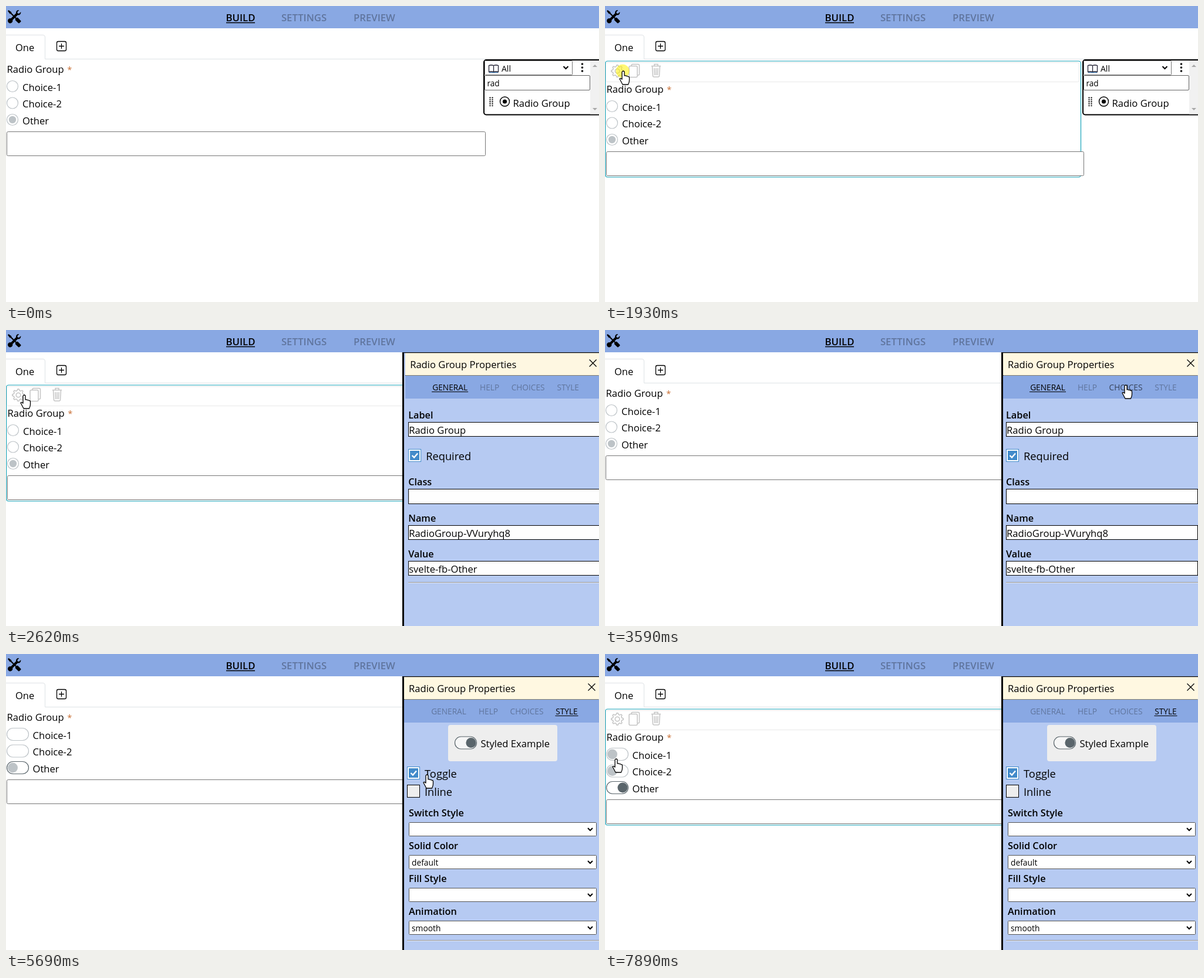
Recreate the animation shown at these times as an HTML page. Size 1010x505 px, loop 8000 ms.

```html
<!DOCTYPE html>
<html lang="en">
<head>
<meta charset="utf-8">
<title>Form builder</title>
<style>
html, body { margin: 0; width: 100%; height: 100%; overflow: hidden; background: #fff; }
svg { display: block; width: 100vw; height: 100vh; }
text { font-family: "Open Sans", "Noto Sans", sans-serif; white-space: pre; }
</style>
</head>
<body>
<svg id="stage" viewBox="0 0 1010 505"></svg>
<script>
const LOOP = 8000;
const BLUE = '#89a8e3', PALE = '#b6caf2', GREY = '#bdc3c7', SLATE = '#5a656b';
const OPEN = 2035, STYLE = 4340, TOGGLED = 5450, SWITCHED = 5620;

// Pointer stops: time, x, y
const stops = [
  [330, 938, 490], [750, 588, 178], [890, 588, 178], [1660, 30, 112], [1730, 31, 111],
  [2740, 31, 111], [3510, 887, 94], [3590, 887, 94], [3940, 943, 97], [4490, 943, 97],
  [5100, 719, 205], [5170, 717, 206], [6200, 717, 206], [6780, 35, 180], [6880, 35, 180],
  [7130, 38, 237], [7210, 38, 237], [7540, 10, 174], [7690, 18, 180], [7820, 18, 180], [7890, 19, 179]
];

const clamp = v => Math.max(0, Math.min(1, v));
const ramp = (t, from, length) => clamp((t - from) / length);
const smooth = v => v * v * (3 - 2 * v);
const mix = (a, b, v) => a + (b - a) * v;

const text = (s, x, y, size = 16.6, extra = '') => `<text x="${x}" y="${y}" font-size="${size}" ${extra}>${s}</text>`;
const rect = (x, y, w, h, fill, stroke = 'none', r = 0, extra = '') =>
  `<rect x="${x}" y="${y}" width="${w}" height="${h}" fill="${fill}" stroke="${stroke}" rx="${r}" ${extra}/>`;
const circle = (x, y, r, fill, stroke = 'none', extra = '') =>
  `<circle cx="${x}" cy="${y}" r="${r}" fill="${fill}" stroke="${stroke}" ${extra}/>`;
const line = (d, stroke = '#000', width = 1, extra = '') =>
  `<path d="${d}" fill="none" stroke="${stroke}" stroke-width="${width}" ${extra}/>`;
const shape = (d, extra = '') => `<path d="${d}" ${extra}/>`;
const group = (attrs, body) => `<g ${attrs}>${body}</g>`;
const move = (x, y, body) => group(`transform="translate(${x} ${y})"`, body);

const tools = 'M1 0L0 1l2.2 3.081a1 1 0 0 0 .815.419h.07a1 1 0 0 1 .708.293l2.675 2.675-2.617 2.654A3 3 0 1 0 5.878 12.149l2.654-2.617.968.968-.305.914a1 1 0 0 0 .242 1.023l3.356 3.356a1 1 0 0 0 1.414 0l1.586-1.586a1 1 0 0 0 0-1.414l-3.356-3.356a1 1 0 0 0-1.023-.242L10.5 9.5l-.96-.96 2.68-2.643A3 3 0 0 0 15.898 2.223l-2.14 2.141L12 4l-.364-1.757L13.777.102a3 3 0 0 0-3.675 3.68L7.462 6.46 4.793 3.793a1 1 0 0 1-.293-.707v-.071a1 1 0 0 0-.419-.814z';
const hand = 'M-2 2a2 2 0 0 1 4 0v6q2-1 3.2.6 2-.9 3 .9 2.3-.4 2.300 2V16q0 3-2 7H-1Q-4 17-6 13.500q.5-2.500 4 .5z';
const arrow = 'M0 0v17l4-4 3 6 2.500-1-3-6h5.500z';

const gear = 'M' + Array.from({ length: 32 }, (_, i) => {
  const r = i % 4 < 2 ? 10.2 : 7.8, a = (i - .5) * Math.PI / 16;
  return (r * Math.cos(a)).toFixed(1) + ' ' + (r * Math.sin(a)).toFixed(1);
}).join('L') + 'z';

function pointer(t) {
  if (t < stops[0][0]) return null;
  const i = stops.findIndex(s => s[0] > t);
  if (i < 0) return stops.at(-1).slice(1);
  const [a, b] = [stops[i - 1], stops[i]], v = smooth(ramp(t, a[0], b[0] - a[0]));
  return [mix(a[1], b[1], v), mix(a[2], b[2], v)];
}

const clickable = (x, y) =>
  (x < 100 && y > 100 && y < 123) || (x < 116 && y > 160 && y < 240) ||
  (x > 722 && y > 86 && y < 110) || (x > 683 && x < 772 && y > 192 && y < 246);

const navItem = (s, x, extra) => text(s, x, 26, 16.7, `font-weight="600" text-anchor="middle" ${extra}`);

function header() {
  return rect(0, 0, 1010, 38, BLUE) +
    group('transform="translate(3 7) scale(1.4)"', shape(tools)) +
    navItem('BUILD', 399.5) + line('M375 28.500H424', '#000', 1.3) +
    navItem('SETTINGS', 507.5, 'opacity=".3"') + navItem('PREVIEW', 627.5, 'opacity=".3"') +
    line('M0 49.500H63q3.500 0 3.500 3.500V90.500H1010', '#dee2e6') + text('One', 16, 77, 16.5) +
    rect(86.5, 60.5, 16, 16, 'none', '#000', 2.5, 'stroke-width="1.3"') +
    line('M90 68.500h9M94.500 64v9', '#000', 1.3);
}

const chevron = (x, y) => line(`M${x - 4} ${y - 2}l4 4 4-4`, '#000', 2);

function palette() {
  let dots = '';
  for (let i = 0; i < 10; i++) dots += circle(824.5 + i % 2 * 4, 156.5 + (i >> 1) * 3.4, 1.2, '#222');
  return rect(814, 92, 210, 93.5, '#fff', '#000', 4, 'stroke-width="2"') +
    rect(995, 93, 15, 91.5, '#f1f1f1') +
    shape('M999 104l4-4 4 4zM999 174l4 4 4-4z', 'fill="#a8a8a8"') +
    rect(815.5, 93.5, 149, 24, '#fff', '#767676', 1) +
    shape('M822.500 101.500q4-1.500 8 0 4-1.500 8 0v11q-4-1.500-8 0-4-1.500-8 0zM830.500 101.500v11', 'fill="#fff" stroke="#223" stroke-width="1.3"') +
    line('M823 113.500h15', '#2c6fb0') +
    text('All', 844, 112, 14) + chevron(953.5, 105) +
    [99, 105, 111].map(y => circle(981.5, y, 1.8, '#000')).join('') +
    rect(815.5, 118.5, 179, 25, '#fff', '#666', 1.5) + text('rad', 819.5, 137, 13.6) +
    dots + circle(849.5, 163, 8, 'none', '#000', 'stroke-width="1.4"') + circle(849.5, 163, 3.6, '#000') +
    text('Radio Group', 863.5, 172);
}

function toolbar() {
  return rect(.5, 94, 810, 198, 'none', '#17a2b8', 4, 'stroke-width="1.2"') +
    rect(1.5, 96.5, 806, 33, 'none', '#e8e8e8', 3) +
    group(`fill="none" stroke="${'#c4c4c4'}" stroke-width="1.5"`,
      move(21, 111, shape(gear) + '<circle r="3.8"/>') +
      shape('M45 103v-1.500q0-2 2-2h9.500q2 0 2 2V116q0 2-2 2H55') +
      '<rect x="41" y="102.500" width="14" height="19" rx="2"/>' +
      shape('M79 102.500h16M84 102v-2.500h6v2.500M80.500 103l1 16q.2 2 2 2h7q1.800 0 2-2l1-16M84 106l.5 12M87 106v12M90 106l-.5 12'));
}

// Switch with its knob sliding from left to right as "on" goes from 0 to 1
function pill(x, y, border, on, show = 1) {
  const cx = mix(x + 10, x + 27.5, on);
  return rect(x, y - 10.5, 37, 21, '#fff', border, 10.5, 'fill-opacity=".5" stroke-width="1.2"') +
    circle(cx, y, 8.5, GREY, 'none', `opacity="${show}"`) + circle(cx, y, 8.5, SLATE, 'none', `opacity="${on}"`);
}
const ring = (x, y, dot) => circle(x, y, 9.5, 'none', GREY, 'stroke-width="1.2"') + circle(x, y, dot, GREY);

function radioGroup(t, hover) {
  const on = smooth(ramp(t, 5700, 260)), show = ramp(t, 5710, 380), switches = t >= SWITCHED;
  const rows = ['Choice-1', 'Choice-2', 'Other'].map((s, i) => {
    const y = [137, 165.5, 194][i], last = i === 2;
    const mark = switches
      ? pill(1.5, y, last ? SLATE : GREY, last ? on : 0, last ? 1 : show)
      : ring(11, y, last ? 6.2 : 0);
    return mark + text(s, switches ? 45.5 : 28, y + 7.5);
  }).join('');
  return (hover ? toolbar() : '') + move(hover ? 1 : 0, hover ? 34 : 0,
    text('Radio Group', 1.5, 113.5) + text('*', 104.5, 113.5, 14, 'fill="#c66a2e"') + rows +
    rect(1.5, 214.5, hover ? 813 : 815, 41, '#fff', '#767676', 2));
}

const label = (s, x, y) => text(s, x, y, 16.3, 'font-weight="600"');
const rule = y => line(`M683 ${y}H1010`, '#999') + line(`M683 ${y + 1}H1010`, '#e4e8f0');

function checkbox(s, y, on) {
  const box = on
    ? rect(683.5, y + .5, 21, 21, '#fff', '#428bca') + rect(686, y + 3, 16, 16, '#428bca') +
      line(`M689.500 ${y + 11}l3.500 3.500 6-7`, '#fff', 2.4)
    : rect(683.5, y + .5, 21, 21, '#eee', '#000');
  return box + text(s, 713, y + 18.5, 18.3);
}

function general() {
  const fields = [['Label', 'Radio Group', 151, 157.5], ['Class', '', 265, 271.5],
    ['Name', 'RadioGroup-VVuryhq8', 327, 333.5], ['Value', 'svelte-fb-Other', 388, 394.5]];
  return fields.map(([name, value, y, top]) =>
    label(name, 683, y) + rect(683.5, top, 326, name === 'Class' ? 25 : 24, '#fff', '#000') +
    text(value, 684, top + 19)).join('') + checkbox('Required', 203, true) + rule(430.5);
}

function styling(t) {
  const toggled = t >= TOGGLED;
  const fields = [['Solid Color', 'default'], ['Fill Style', ''], ['Animation', 'smooth']];
  if (toggled) fields.unshift(['Switch Style', '']);
  const example = toggled
    ? pill(764.5, 151.5, SLATE, smooth(ramp(t, TOGGLED, 220)))
    : ring(774, 152, 6.2 * smooth(ramp(t, 4390, 240)));
  return rect(753, 121, 186, 62, '#eee', 'none', 4) + example +
    text('Styled Example', toggled ? 808.5 : 791, 159) +
    checkbox('Toggle', 192, toggled) + checkbox('Inline', 223, false) +
    fields.map(([name, value], i) => move(0, i * 56,
      label(name, 686, 276.5) + rect(686.5, 287.5, 319, 23, '#fff', '#555', 1) +
      text(value, 691, 304.5, 13.8) + chevron(995, 299))).join('') +
    rule(264.5 + fields.length * 56);
}

function panel(t, x, y) {
  const enter = 1 - (1 - ramp(t, OPEN, 750)) ** 3;
  const active = t < STYLE ? 'GENERAL' : 'STYLE';
  const tabs = [['GENERAL', 754, 31], ['HELP', 821.5, 17], ['CHOICES', 887, 29.5], ['STYLE', 955, 19.5]];
  const bar = tabs.map(([s, cx, half]) => {
    const over = Math.abs(x - cx) < half && y > 86 && y < 110;
    const alpha = s !== active ? (over ? .6 : .3) : s === 'STYLE' ? mix(.6, 1, ramp(t, STYLE, 350)) : 1;
    return group(`opacity="${alpha}"`, text(s, cx, 103, 13.7, 'font-weight="500" text-anchor="middle"') +
      (s === active ? line(`M${cx - half} 105.500h${2 * half}`, '#000', 1.2) : ''));
  }).join('');
  return rect(675, 38, 335, 467, PALE) +
    group(`transform="translate(${200 * (1 - enter)} 0)" opacity="${enter}"`,
      rect(678, 39, 332, 39, '#fff8e1') + text('Radio Group Properties', 686, 65) +
      line('M991.500 50.500l12 12m0-12l-12 12', '#000', 1.3) +
      rect(678, 78, 332, 39, BLUE) + line('M678 77.500H1010', '#000', 1, 'stroke-dasharray="1 1"') +
      bar + (t < STYLE + 70 ? general() : styling(t))) +
    rect(675, 38, 3, 467, '#000') + rect(675, 38, 335, 1.2, '#000');
}

const clicks = [[1930, 2070], [STYLE, STYLE + 110], [5310, 5440]];

function draw(t) {
  const at = pointer(t), [x, y] = at || [2000, 2000], open = t >= OPEN;
  const hover = x < (open ? 675 : 816) && y > 93 && y < 293;
  let out = header() + radioGroup(t, hover) + (open ? panel(t, x, y) : palette());
  if (clicks.some(([a, b]) => t >= a && t < b)) out += circle(x - 1, y, 11.5, '#fff000', 'none', 'opacity=".55"');
  if (at) out += move(x, y, shape(clickable(x, y) ? hand : arrow,
    'fill="#fff" stroke="#000" stroke-width="1.3" stroke-linejoin="round"'));
  return out;
}

const stage = document.getElementById('stage');
let start;
function tick(now) {
  start ??= now;
  stage.innerHTML = draw((now - start) % LOOP);
  requestAnimationFrame(tick);
}
requestAnimationFrame(tick);
</script>
</body>
</html>
```
